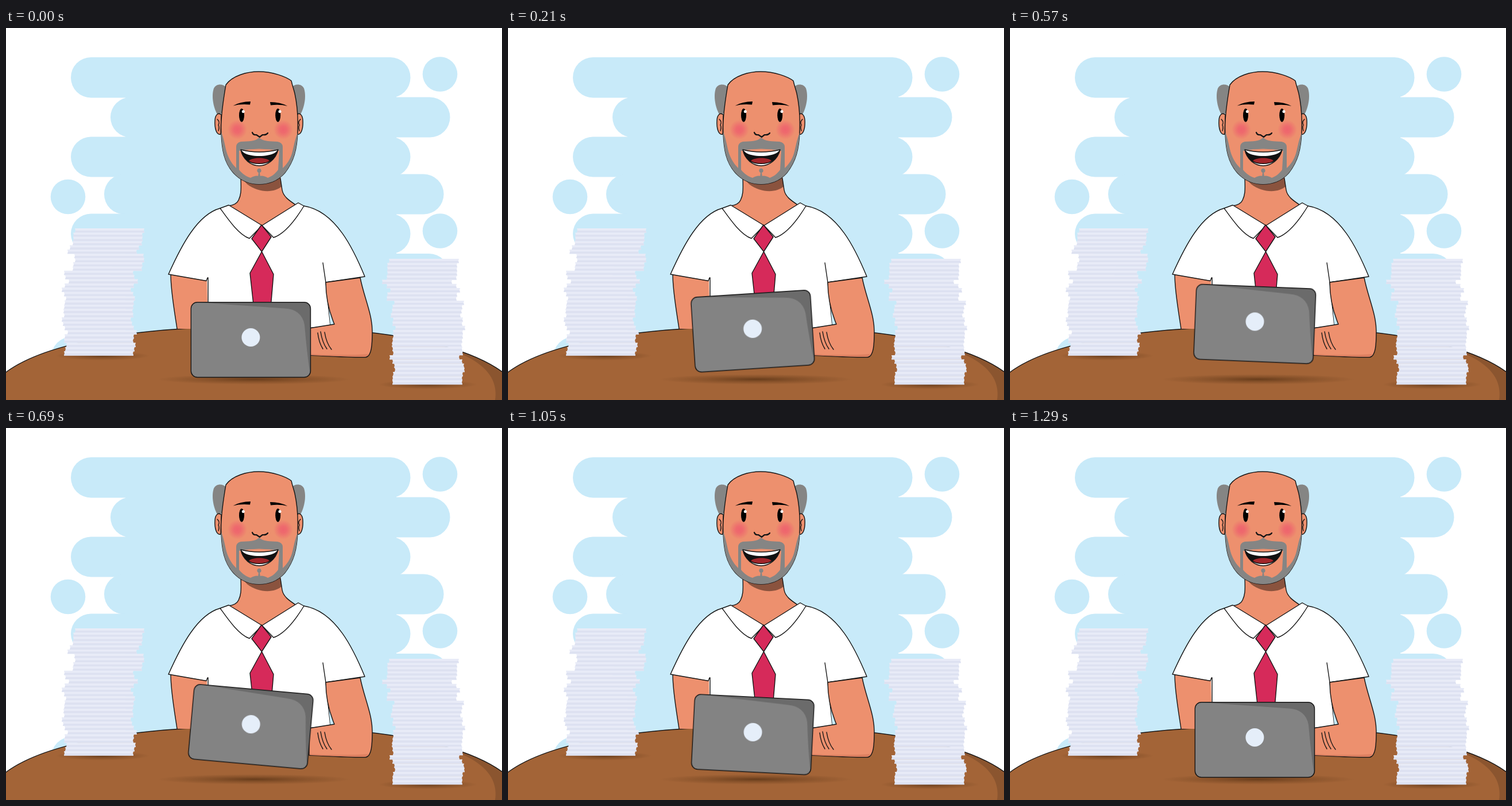
Write an HTML page that moves like this. It is 864 by 648 pixels and loops after 1800 ms.

```html
<!DOCTYPE html>
<html lang="en">
<head>
<meta charset="utf-8">
<title>Bouncing laptop</title>
<style>
  html, body { margin: 0; width: 100%; height: 100%; overflow: hidden; background: #fff; }
  svg { display: block; width: 100vw; height: 100vh; }
  .line { stroke: #151515; stroke-width: 1.4; stroke-linejoin: round; stroke-linecap: round; }
  .bold { stroke-width: 2.2; }
  .none { fill: none; }
  .skin { fill: #ed906e; }
  .hair { fill: #858584; }
  .shirt { fill: #fff; }
  .tie { fill: #d62a5a; }
  .lift { animation: lift 1.8s linear infinite; }
  .tilt { animation: tilt 1.8s linear infinite; transform-origin: 426.4px 543px; }
  @keyframes lift {
    0%, 71.667%, 100% { transform: translateY(0); }
    25% { transform: translateY(-32.2px); }
  }
  @keyframes tilt {
    0%, 71.667%, 100% { transform: rotate(0deg); }
    15% { transform: rotate(-4.7deg); }
    41.667% { transform: rotate(6.5deg); }
  }
</style>
</head>
<body>
<svg viewBox="0 0 864 648">
  <defs>
    <radialGradient id="blush">
      <stop offset="0" stop-color="#ee646d"/>
      <stop offset=".35" stop-color="#ee646d" stop-opacity=".85"/>
      <stop offset="1" stop-color="#ee646d" stop-opacity="0"/>
    </radialGradient>
    <radialGradient id="shade">
      <stop offset="0" stop-color="#5c3516" stop-opacity=".85"/>
      <stop offset=".5" stop-color="#6b3f1d" stop-opacity=".45"/>
      <stop offset="1" stop-color="#6b3f1d" stop-opacity="0"/>
    </radialGradient>
    <path id="head" d="M383 99C394 83 420 76 440 76C465 76 488 85 497 92C499 101 501 106 503 114C507 132 509 156 508 180C507 212 501 233 486 252C474 266 458 272 441 272C424 272 408 266 395 251C380 233 376 212 375 184C373 160 378 128 383 99Z"/>
    <clipPath id="face"><use href="#head"/></clipPath>
    <path id="mouth" d="M409 212Q441 220 474 212C470 229 455 240 441 240C427 240 412 229 409 212Z"/>
    <clipPath id="lips"><use href="#mouth"/></clipPath>
  </defs>

  <g fill="#c8eaf9">
    <rect x="113" y="51" width="591.5" height="70.5" rx="35"/>
    <rect x="182" y="120.5" width="591.5" height="70" rx="35"/>
    <rect x="113" y="189.5" width="591.5" height="70" rx="35"/>
    <rect x="171" y="254.5" width="591.5" height="70" rx="35"/>
    <rect x="113" y="323.5" width="591.5" height="70" rx="35"/>
    <rect x="182" y="393" width="590" height="70" rx="35"/>
    <rect x="79" y="538" width="400" height="70" rx="35"/>
    <path d="M208 85H680V560H208Z"/>
    <circle cx="756" cy="80.5" r="30.3"/>
    <circle cx="108" cy="294" r="30.3"/>
    <circle cx="756" cy="353.5" r="30.3"/>
  </g>

  <!-- table -->
  <path class="line" fill="#8b552f" d="M-2 601C70 546 240 520 430 520C610 520 785 540 866 600V652H-2Z"/>
  <path fill="#a36437" d="M0 601C70 547 240 521 430 521C600 521 730 538 798 570C838 589 857 614 852 648H0Z"/>
  <ellipse cx="432" cy="612" rx="168" ry="9" fill="url(#shade)"/>
  <ellipse cx="168" cy="571" rx="82" ry="8" fill="url(#shade)"/>
  <ellipse cx="735" cy="621" rx="86" ry="8" fill="url(#shade)"/>

  <!-- arms and body -->
  <path class="skin" d="M287 430C287 458 293 490 298 524H353V436Z"/>
  <path class="none line" d="M287 430C287 458 293 490 298 524"/>
  <path class="skin" d="M409 258C410 285 409 292 405 300C402 307 395 309 387 310L446 346L506 309C492 300 483 292 481 282L478 258Z"/>
  <path fill="#8a533e" d="M409 260C430 272 460 270 478 260L480 276C468 287 441 288 420 272Z"/>
  <path class="none line" d="M409 262C410 285 409 292 405 300C402 307 395 309 387 310M478 262L481 282C483 294 494 301 506 309"/>
  <path class="shirt" d="M373 314C333 325 305 380 283 429L350 440L352 530L565 520L557 443L625 433C606 387 575 319 519 310L446 344Z"/>
  <path class="none line" d="M373 314C333 325 305 380 283 429L349 440.500L351 435M352 435V530M519 310C575 319 606 387 625 433L557 443M552 409L557 443L565 518L530 523"/>
  <path fill="#c8eaf9" d="M558 445L571 516L565 518Z"/>
  <path class="skin line" d="M557 443L617 435C623 467 638 498 638 528C638 552 637 571 627 573.5C600 574 570 572 528 570V523L572 516C562 492 557 470 557 443Z"/>
  <path fill="#dc7f60" d="M530 568Q585 571 632 568Q629 572 624 573Q570 572 530 570Z"/>
  <path class="none line" d="M543 531Q545 548 552 559M548 529Q551 548 559 559M555 530Q558 549 567 560"/>
  <path class="shirt line" d="M373 314L388 308.5L446 344L424 366.500C405 360 386 332 373 314ZM519 310L509 304.5L446 344L466 365C487 358 508 328 519 310Z"/>
  <path class="tie line" d="M445 343L462 364L445.5 389.5L428 367ZM445.5 389.5L466 429L460 500H433L425 427Z"/>

  <!-- head -->
  <g id="sides">
    <path class="hair" d="M385 104C378 97 367 96 362 105C357 120 362 141 369 152L376 148Z"/>
    <path class="skin line" d="M375 151C370 147 365 150 364 160C363 176 367 187 374 185Z"/>
    <path class="none line" d="M368 159Q373 163 370 169Q372 173 370 179"/>
  </g>
  <use href="#sides" transform="matrix(-1 0 0 1 881 0)"/>
  <use href="#head" class="skin line"/>
  <g clip-path="url(#face)">
    <path class="hair" d="M370 170C379 187 381 204 384 215C388 229 395 238 401 244V207Q401 200 409 198C424 197 433 198 441 191C449 198 459 197 473 198Q482 200 482 207V244C489 238 496 228 499 215C502 204 504 187 514 170V280H370Z"/>
    <path class="skin" d="M406 214Q441 207 476 214L474 247C468 255 462 259 456 261Q448 256 441 258Q434 256 426 261C418 259 411 253 406 247Z"/>
    <path class="hair" d="M438 246Q441 243 444 246Q446 251 442 252L443 259H439L440 252Q436 250 438 246Z"/>
  </g>
  <circle cx="403" cy="177" r="17" fill="url(#blush)"/>
  <circle cx="483" cy="177" r="17" fill="url(#blush)"/>
  <path d="M395.5 135.5Q408 128 426 128L425 133.5Q408 132 395.5 135.5ZM490.5 136Q478 129 460 129L461 134.5Q477 132.500 490.5 136Z"/>
  <ellipse cx="410.5" cy="152" rx="4.5" ry="11.7"/>
  <ellipse cx="473.7" cy="152" rx="4.5" ry="11.7"/>
  <g fill="#fff">
    <circle cx="413.3" cy="145.5" r="2.5"/>
    <circle cx="477" cy="145.5" r="2.5"/>
  </g>
  <path class="none line bold" d="M429 182Q431 187 436 186Q439 188 442 190Q444 188 447 186Q453 187 456 183"/>
  <use href="#mouth" fill="#fff"/>
  <g clip-path="url(#lips)">
    <path fill="#111" d="M405 208L414 217C426 225 456 225 469 217L478 208C470 229 460 237 441 237C422 237 413 229 405 208Z"/>
    <path fill="#a3262b" d="M423 231C430 225 452 225 459 231C452 237 430 237 423 231Z"/>
  </g>
  <use href="#mouth" class="none line"/>

  <g id="papers"></g>

  <!-- laptop -->
  <g class="lift"><g class="tilt">
    <rect x="322.3" y="477.7" width="208.2" height="130.8" rx="11" fill="#838383"/>
    <path fill="#6b6b6b" d="M335 478L485 488.5Q515 490 520 517Q524 565 529.5 601Q530.5 599 530.5 595V489Q530 478 519 478Z"/>
    <rect class="none line" x="322.3" y="477.7" width="208.2" height="130.8" rx="11"/>
    <circle cx="426.4" cy="539" r="16" fill="#e5eef9"/>
  </g></g>
</svg>
<script>
  const papers = document.getElementById("papers");

  function add(d, fill) {
    const path = document.createElementNS("http://www.w3.org/2000/svg", "path");
    path.setAttribute("d", d);
    path.setAttribute("fill", fill);
    papers.append(path);
  }

  // Each entry nudges one sheet sideways from x.
  function stack(x, top, bottom, width, nudges) {
    const h = (bottom - top) / nudges.length;
    nudges.forEach((dx, i) => {
      const l = x + dx, r = l + width, y = top + i * h;
      add(`M${l} ${y}H${r}l-1 ${h / 2}l1 ${h / 2 + 0.3}H${l}l1 ${-h / 2}Z`, "#e8ebf7");
      add(`M${l + 1} ${y + h * 0.5}H${r - 1}l1 ${h * 0.5}H${l}Z`, "#dde1f1");
    });
  }

  stack(101, 349, 570.5, 121,
    [19, 16, 16, 15, 10, 6, 18, 19, 16, 15, 0, 2, 8, 1, -4, 0, 3, 1, 0, -1, 0, -4, -2, 1, 6, 1, 0, 4, 2, 0]);
  stack(673, 402, 621, 122,
    [-6, -9, -9, -9, -10, -18, -10, -4, -9, -10, 3, 0, -1, -3, 1, 0, 5, 1, 1, 0, -1, 0, 1, -5, 0, 3, 4, 1, 0, 0]);
</script>
</body>
</html>
```
